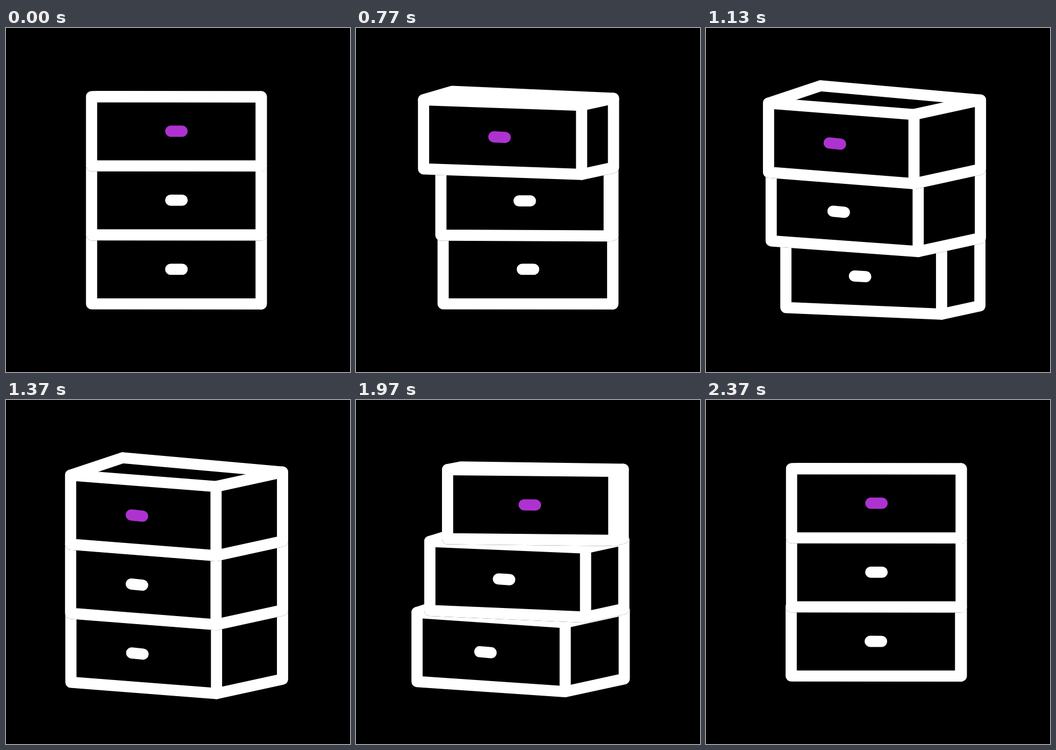
Write an HTML page with a canvas that moves like this. It is 640 px wide and 640 px high and loops after 2.5 s.

```html
<!DOCTYPE html>
<html>
<head>
<meta charset="utf-8">
<style>
  html, body { margin: 0; height: 100%; overflow: hidden; background: #000; }
  canvas { display: block; width: 100vw; height: 100vh; }
</style>
</head>
<body>
<canvas width="640" height="640"></canvas>
<script>
const ctx = document.querySelector('canvas').getContext('2d');
const LOOP = 2500, FRAMES = 75;
const STEP = 128.4, HEIGHT = 128.6, STAGGER = 5, SHIFT = 37;
ctx.lineJoin = ctx.lineCap = 'round';
ctx.lineWidth = 20.8;

// Eased progress along cubic-bezier(x1, 0, x2, 1)
function ease(frame, start, length, x1, x2) {
  const x = Math.min(1, Math.max(0, (frame - start) / length));
  let lo = 0, hi = 1;
  for (let i = 0; i < 24; i++) {
    const u = (lo + hi) / 2, v = 1 - u;
    if (3 * u * v * v * x1 + 3 * u * u * v * x2 + u ** 3 < x) lo = u; else hi = u;
  }
  return lo * lo * (3 - 2 * lo);
}

const closing = (frame, start) => ease(frame, start, 17.5, 0.485, 0.845);
const turn = (frame, delay) =>
  ease(frame, 16 + delay, 16, 0.294, 0.575) - closing(frame, 44 + delay);
const slide = frame =>
  SHIFT * (ease(frame, 20, 17.5, 1 / 3, 2 / 3) - closing(frame, 49.2));

function trace(points, closed) {
  ctx.beginPath();
  points.forEach(p => ctx.lineTo(...p));
  if (closed) ctx.closePath();
}

function drawDrawer(p, dx, dy, handleColor) {
  const at = (x, y, mx, my) => [x + dx + mx * p, y + dy + my * p];
  const below = ([x, y]) => [x, y + HEIGHT];
  const frontLeft = at(159.2, 127.8, -76, 12);
  const frontRight = at(474.8, 128, -121, 33);
  const backRight = at(475, 128, 2.5, 6);
  const backLeft = at(172, 127.5, 8, -20);

  // The black pass covers whatever stands behind this drawer
  trace([frontLeft, backLeft, backRight, below(backRight), below(frontRight), below(frontLeft)], true);
  ctx.fillStyle = ctx.strokeStyle = '#000';
  ctx.fill();
  ctx.stroke();
  ctx.strokeStyle = '#fff';
  ctx.stroke();
  trace([frontLeft, frontRight, backRight]);
  ctx.stroke();
  trace([frontRight, below(frontRight)]);
  ctx.stroke();

  trace([at(306.5, 192, -110.5, 21.9), at(327.7, 192, -110.5, 24.1)]);
  ctx.strokeStyle = handleColor;
  ctx.stroke();
}

function render(now) {
  const frame = Math.floor((now % LOOP + 5) * FRAMES / LOOP);
  const dx = slide(frame);
  ctx.fillStyle = '#000';
  ctx.fillRect(0, 0, 640, 640);
  for (let i = 2; i >= 0; i--) {
    drawDrawer(turn(frame, i * STAGGER), dx, i * STEP, i ? '#fff' : '#ae32d0');
  }
  requestAnimationFrame(render);
}
requestAnimationFrame(render);
</script>
</body>
</html>
```
